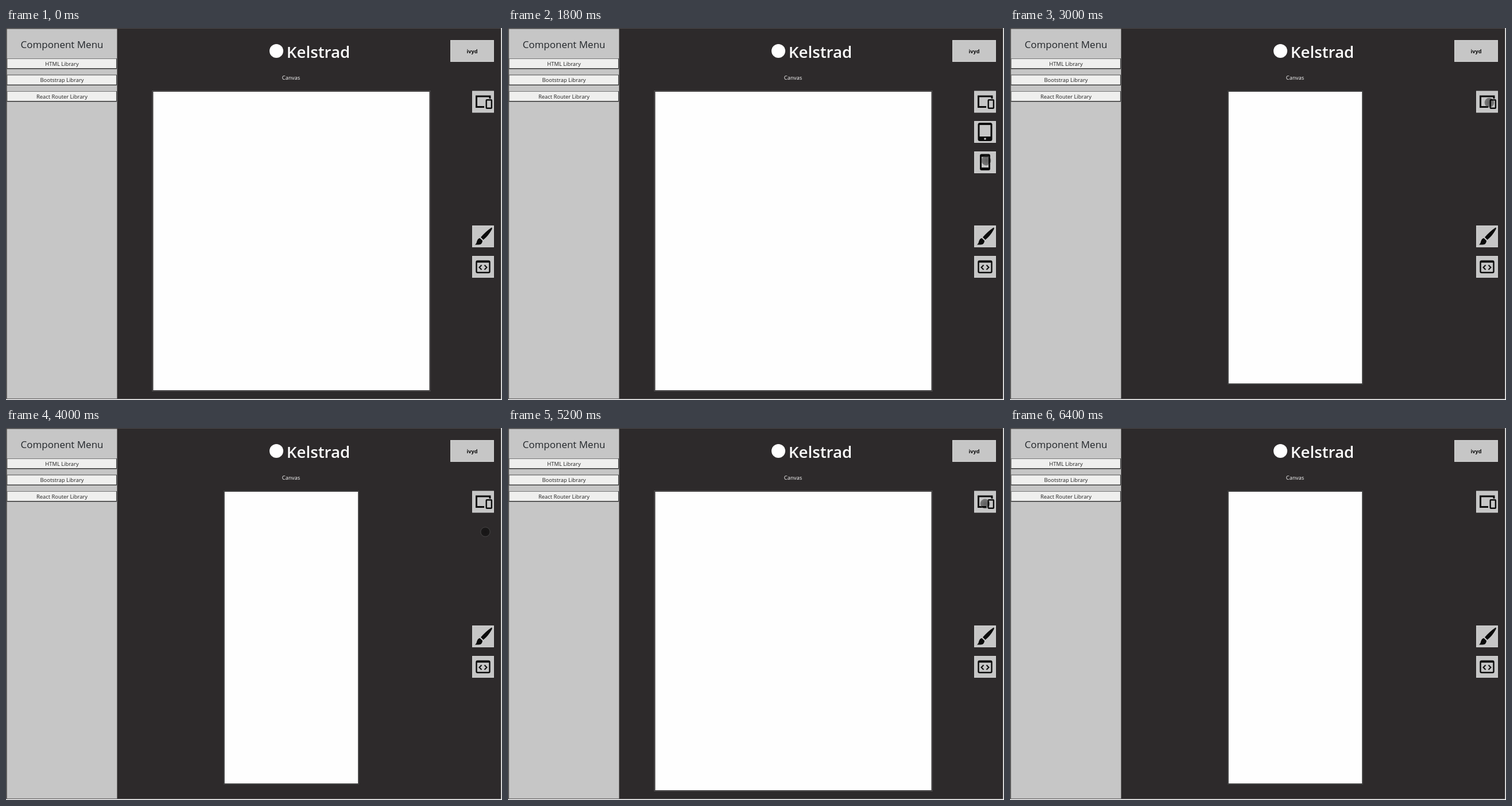
Recreate the animation shown at these times as an HTML page. Size 864x648 px, loop 7.2 s.

```html
<!DOCTYPE html>
<html lang="en">
<head>
<meta charset="utf-8">
<title>Component canvas</title>
<style>
  html, body { margin: 0; width: 100%; height: 100%; overflow: hidden; background: #fff; }
  svg { display: block; width: 864px; height: 648px; }
  text { font-family: "Open Sans", "Noto Sans", sans-serif; font-size: 9.4px; text-anchor: middle; }
  .heading { font-size: 17px; font-weight: 500; fill: #212529; }
  .title { font-size: 27.7px; font-weight: 600; fill: #fff; }
  .user { font-size: 9.2px; font-weight: 700; }
  .line { fill: none; stroke: #0b0b0b; stroke-width: 2.4; }
  .ink { fill: #0b0b0b; }
  .grey { fill: #c6c6c6; }
</style>
</head>
<body>
<svg viewBox="0 0 864 648">
  <defs>
    <radialGradient id="shade">
      <stop offset="0" stop-opacity=".52"/>
      <stop offset="1" stop-opacity=".4"/>
    </radialGradient>
  </defs>

  <rect width="862.5" height="646.5" fill="#4b494a"/>
  <rect x="1" y="1" width="861" height="645" fill="#2d2a2b"/>
  <rect class="grey" x="1.5" y="1.5" width="192" height="644"/>

  <text class="heading" x="97.5" y="35">Component Menu</text>
  <g id="libs"></g>

  <circle cx="471" cy="40" r="12" fill="#fff"/>
  <text class="title" x="544" y="52">Kelstrad</text>
  <text x="496.5" y="90" fill="#fff">Canvas</text>

  <rect id="edge" y="109.5" fill="#2d2a2b"/>
  <rect id="page" y="111" fill="#fefefe"/>

  <g id="buttons"></g>
  <text class="user ink" x="812" y="43.5">ivyd</text>

  <!-- devices -->
  <path class="line" style="stroke-width:3" d="M843 123V119H819.5V137.5H833"/>
  <rect class="line" x="836.7" y="125.2" width="9.2" height="14.6" rx="1"/>

  <!-- brush -->
  <path class="ink" d="M846 347.5Q848 348.5 845 353 840 362 831.5 369L827 364.5Q836 354 846 347.5ZM825.5 366L830 370.5Q830 377 823 377.5H817Q820 375 820.5 371 822 366.5 825.5 366Z"/>

  <!-- code window -->
  <rect class="line" x="819.5" y="406" width="23" height="20" rx="2"/>
  <path class="line" d="M819 407.5H843"/>
  <path class="line" style="stroke-width:2" d="M828.5 413l-4 4 4 4m5-8l4 4-4 4"/>

  <g id="menu">
    <rect class="ink" x="818.5" y="165" width="25" height="32" rx="3.5"/>
    <rect class="grey" x="821.5" y="169" width="19" height="20"/>
    <circle class="grey" cx="831" cy="193" r="1.8"/>
    <rect class="ink" x="822" y="219.5" width="18" height="28.5" rx="3"/>
    <rect class="grey" x="825" y="224.5" width="12" height="18.5"/>
  </g>

  <circle id="dot" r="8.2" fill="url(#shade)" stroke="#777" stroke-opacity=".4"/>
</svg>

<script>
const LOOP = 7200, TICK = 200;
const $ = id => document.getElementById(id);

const set = (el, attrs) => {
  for (const key in attrs) el.setAttribute(key, attrs[key]);
  return el;
};

const make = (tag, attrs) =>
  set(document.createElementNS('http://www.w3.org/2000/svg', tag), attrs);

const rect = (x, y, width, height, fill) => make('rect', { x, y, width, height, fill });

['HTML', 'Bootstrap', 'React Router'].forEach((name, i) => {
  const y = 53 + i * 28.5;
  const label = make('text', { x: 97.5, y: y + 12.6, fill: '#212121' });
  label.textContent = name + ' Library';
  $('libs').append(
    rect(1.5, y, 191.5, 18.5, '#343434'),
    rect(1.5, y, 190.5, 17, '#777'),
    rect(2.5, y + 1, 189.5, 16, '#efefee'),
    label
  );
});

const button = (y, x = 812.5, width = 37) =>
  set(rect(x, y, width, 37, '#c6c6c6'), { stroke: '#d2d2d2' });
$('buttons').append(button(21.5, 774.5, 75), button(110), button(344.5), button(397.5));
$('menu').prepend(button(162.5), button(215.5));

const WIDE = { left: 255, right: 739, bottom: 632.5, line: '#555354', gap: 1.5 };
const SLIM = { left: 379.5, right: 614.5, bottom: 620.5, line: '#3f4242', gap: 1.3 };

// pointer path: time, x, y
const path = [
  [200, 114, 621],
  [800, 804, 36],
  [1200, 835, 136],
  [1800, 833, 231],
  [2000, 833, 231],
  [2400, 842, 49],
  [3000, 835, 130],
  [3600, 835, 181],
  [4000, 835, 181],
  [4200, 786, 178],
  [4400, 761, 176],
  [4600, 761, 176],
  [5200, 831, 132],
  [5800, 833, 228],
  [6000, 833, 228],
  [6200, 847, 229]
];

const within = (t, from, to) => t >= from && t < to;

function pointer(t) {
  const i = path.findIndex(p => p[0] >= t);
  if (i < 1) return path[0];
  const a = path[i - 1], b = path[i];
  const k = (t - a[0]) / (b[0] - a[0]);
  return a.map((v, n) => v + (b[n] - v) * k);
}

function draw(time) {
  const t = Math.floor(time / TICK) * TICK;
  const slim = within(t, 2000, 4200) || t >= 6200;
  const open = within(t, 1200, 2000) || within(t, 3200, 4000) || within(t, 5400, 6200);
  const { left, right, bottom, line, gap } = slim ? SLIM : WIDE;
  const width = right - left;
  set($('edge'), { x: left, width, height: bottom - 109.5, stroke: line });
  set($('page'), { x: left + gap, width: width - 2 * gap, height: bottom - 111 - gap });
  set($('menu'), { visibility: open ? 'visible' : 'hidden' });
  const [, cx, cy] = pointer(t);
  set($('dot'), { cx, cy, visibility: within(t, 200, 6400) ? 'visible' : 'hidden' });
}

const start = performance.now();
function tick() {
  draw((performance.now() - start) % LOOP);
  requestAnimationFrame(tick);
}
tick();
</script>
</body>
</html>
```
